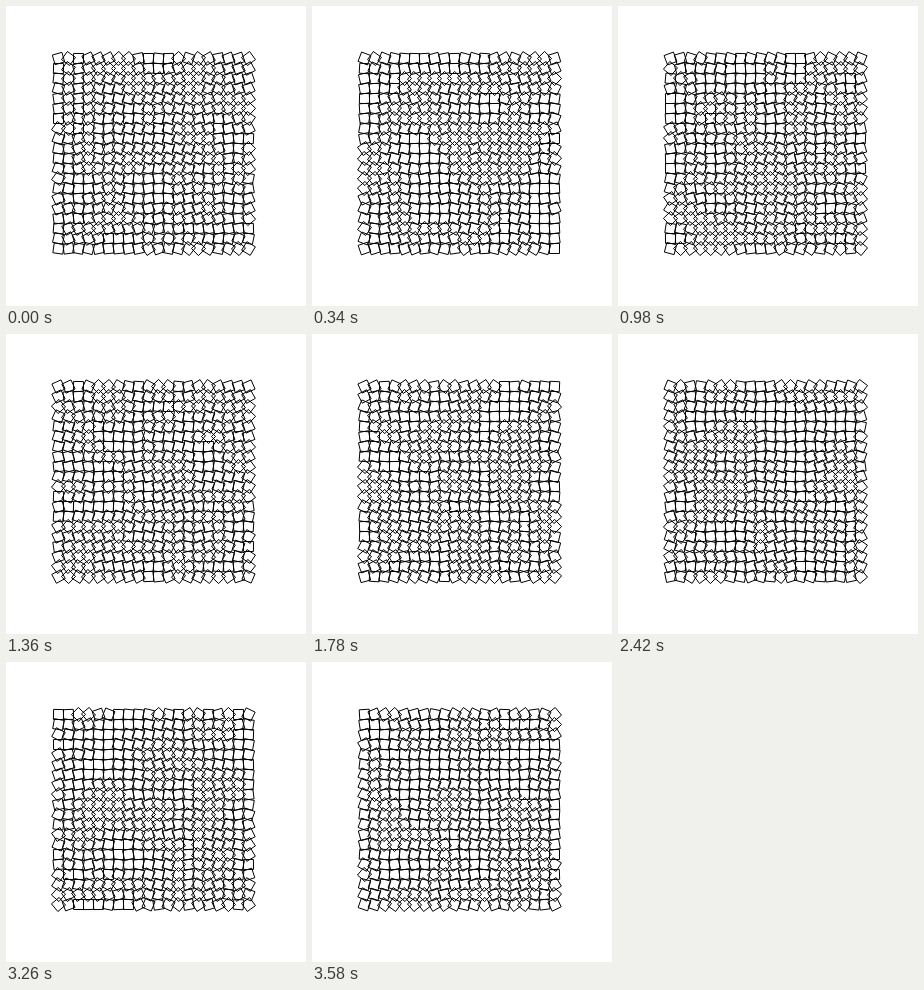
An HTML page with a canvas for the animation above (3600 ms loop, 300 px wide and 300 px high).

```html
<!DOCTYPE html>
<html lang="en">
<head>
<meta charset="utf-8">
<title>Turning squares</title>
<style>
html, body { margin: 0; width: 100%; height: 100%; overflow: hidden; background: #fff; }
canvas { display: block; width: 300px; height: 300px; }
</style>
</head>
<body>
<canvas id="stage" width="300" height="300"></canvas>
<script>
const ctx = document.getElementById('stage').getContext('2d');
const LOOP = 3600, STEP = 20;
const COUNT = 20, SIZE = 10, FIRST = 52.5;
const SPACE_RATE = 0.2, TIME_RATE = 0.02, OCTAVES = 4;

// Seeded lattice values in 0..1
let seed = 20;
const lattice = Float32Array.from({ length: 4096 }, () => {
  seed = (seed + 0x6D2B79F5) | 0;
  let n = Math.imul(seed ^ (seed >>> 15), 1 | seed);
  n = (n + Math.imul(n ^ (n >>> 7), 61 | n)) ^ n;
  return ((n ^ (n >>> 14)) >>> 0) / 4294967296;
});

const ease = f => (1 - Math.cos(Math.PI * f)) / 2;
const mix = (a, b, f) => a + (b - a) * f;
const at = (x, y, z) => lattice[(x + (y << 4) + (z << 8)) & 4095];

function valueNoise(x, y, z) {
  const xi = Math.floor(x), yi = Math.floor(y), zi = Math.floor(z);
  const fx = ease(x - xi), fy = ease(y - yi), fz = ease(z - zi);
  const row = (b, c) => mix(at(xi, b, c), at(xi + 1, b, c), fx);
  const layer = c => mix(row(yi, c), row(yi + 1, c), fy);
  return mix(layer(zi), layer(zi + 1), fz);
}

function noise(x, y, z) {
  let sum = 0;
  for (let o = 0, k = 1; o < OCTAVES; o++, k *= 2) {
    sum += valueNoise(x * k, y * k, z * k) / (2 * k);
  }
  return sum;
}

function square(cx, cy, angle) {
  const r = SIZE / Math.SQRT2;
  for (let k = 0; k < 4; k++) {
    const a = angle + Math.PI / 4 + k * Math.PI / 2;
    ctx[k ? 'lineTo' : 'moveTo'](cx + r * Math.cos(a), cy + r * Math.sin(a));
  }
  ctx.closePath();
}

function draw(time) {
  const tick = Math.floor((time % LOOP) / STEP);
  ctx.fillStyle = '#fff';
  ctx.fillRect(0, 0, 300, 300);
  ctx.strokeStyle = '#000';
  ctx.lineWidth = 1;
  for (let j = 0; j < COUNT; j++) {
    for (let i = 0; i < COUNT; i++) {
      const turn = noise(i * SPACE_RATE, j * SPACE_RATE, tick * TIME_RATE);
      ctx.beginPath();
      square(FIRST + i * SIZE, FIRST + j * SIZE, turn * 2 * Math.PI);
      ctx.stroke();
    }
  }
}

const start = performance.now();
function loop() {
  draw(performance.now() - start);
  requestAnimationFrame(loop);
}
loop();
</script>
</body>
</html>
```
